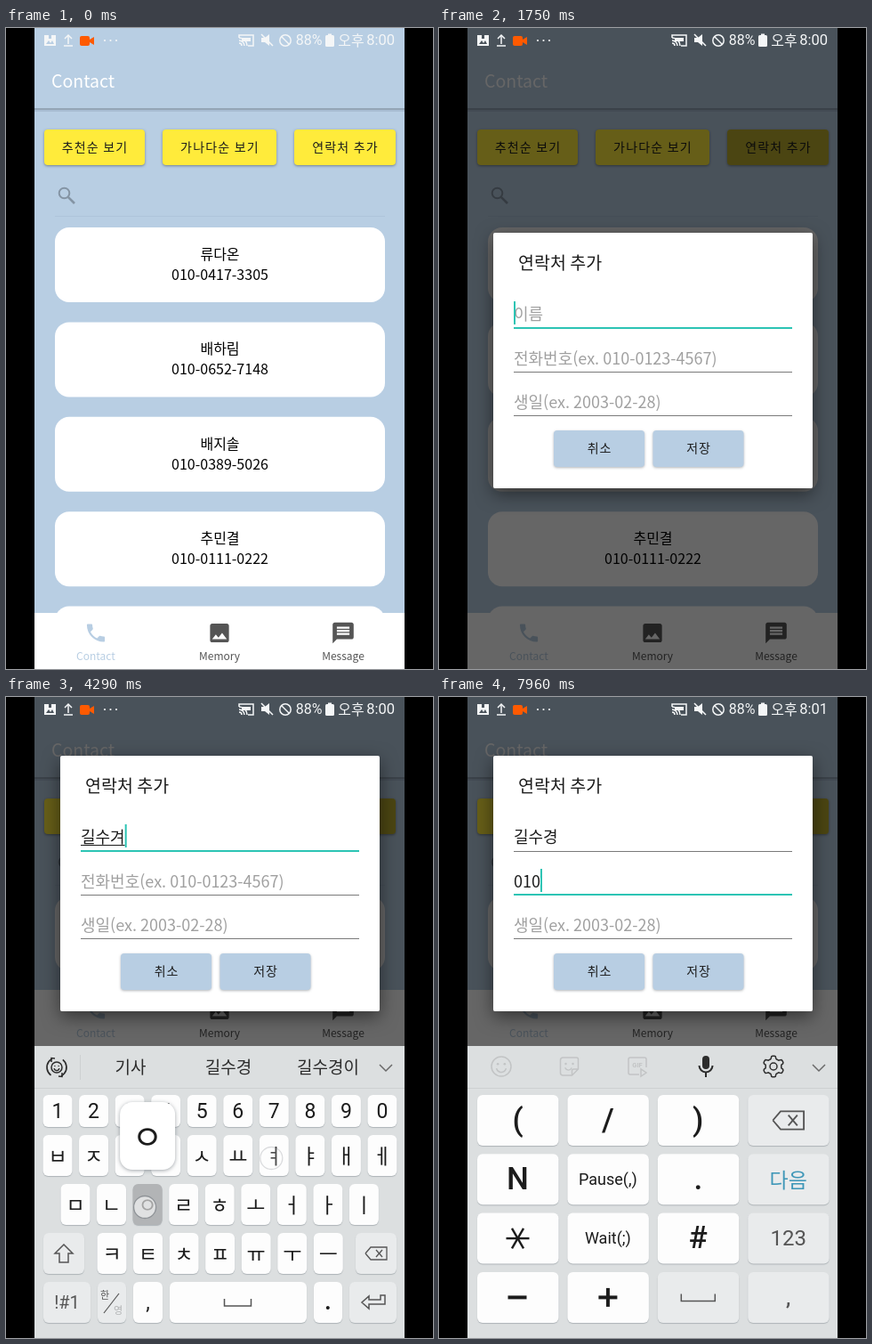
These frames come from a looping animation (480 by 720 pixels, 8000 ms). An HTML page with a canvas:

```html
<!DOCTYPE html>
<html lang="ko">
<head>
<meta charset="utf-8">
<title>Contact</title>
<style>
html, body { margin: 0; width: 100%; height: 100%; overflow: hidden; background: #000; }
canvas { display: block; width: 480px; height: 720px; }
</style>
</head>
<body>
<canvas id="stage" width="480" height="720"></canvas>
<script>
const ctx = document.getElementById('stage').getContext('2d');
const LOOP = 8000;
const KR = '"Noto Sans CJK KR", "Noto Sans CJK", sans-serif';
const UI = 'Roboto, "Noto Sans CJK KR", sans-serif';
const BLUE = '#b8cee3', YELLOW = '#ffeb3b', TEAL = '#2cc4b4';
const INK = '#1c1c1c', GREY = '#555555', HINT = '#a0a0a0', FAINT = '#c2c4c5';
const KEY = '#fdfdfd', FN = '#e9ebec', HELD = '#b2b4b6', BOARD = '#dcdfe0', KEY_EDGE = 'rgba(90,100,110,.35)';

const NAME = '길수경';
const CARDS = [
  ['류다온', '010-0417-3305'], ['배하림', '010-0652-7148'],
  ['배지솔', '010-0389-5026'], ['추민결', '010-0111-0222']
];

const PHONE = new Path2D('M6.6 10.8c1.4 2.8 3.8 5.1 6.6 6.6l2.2-2.2c.3-.3.7-.4 1-.2 1.1.4 2.3.6 3.6.6.5 0 1 .4 1 1V20c0 .5-.5 1-1 1-9.4 0-17-7.6-17-17 0-.6.4-1 1-1h3.5c.5 0 1 .4 1 1 0 1.2.2 2.4.6 3.6.1.3 0 .7-.3 1z');
const IMAGE = new Path2D('M21 19V5c0-1.1-.9-2-2-2H5c-1.1 0-2 .9-2 2v14c0 1.1.9 2 2 2h14c1.1 0 2-.9 2-2zM8.5 13.5l2.5 3 3.5-4.5 4.5 6H5z');
const MESSAGE = new Path2D('M20 2H4C3 2 2 3 2 4v18l4-4h14c1.1 0 2-.9 2-2V4c0-1.1-.9-2-2-2zM6 12h12v2H6zM6 9h12v2H6zM6 6h12v2H6z');

const clamp = v => Math.max(0, Math.min(1, v));
const span = (t, a, b) => clamp((t - a) / (b - a));

function rect(x, y, w, h, color) { ctx.fillStyle = color; ctx.fillRect(x, y, w, h); }
function box(x, y, w, h, r, color, shadow, blur = 3, dy = 1) {
  ctx.save();
  if (shadow) { ctx.shadowColor = shadow; ctx.shadowBlur = blur; ctx.shadowOffsetY = dy; }
  ctx.fillStyle = color;
  ctx.beginPath(); ctx.roundRect(x, y, w, h, r); ctx.fill();
  ctx.restore();
}
function text(s, x, y, size, color, { align = 'center', font = KR, weight = 400, gap = 0 } = {}) {
  ctx.font = `${weight} ${size}px ${font}`;
  ctx.letterSpacing = gap + 'px';
  ctx.textAlign = align;
  ctx.textBaseline = 'middle';
  ctx.fillStyle = color;
  ctx.fillText(s, x, y);
}
function line(points, color, width = 1.5) {
  ctx.strokeStyle = color; ctx.lineWidth = width;
  ctx.beginPath();
  points.forEach(([x, y], i) => i ? ctx.lineTo(x, y) : ctx.moveTo(x, y));
  ctx.stroke();
}
function arc(x, y, r, color, width = 1.5, a = 0, b = Math.PI * 2) {
  ctx.strokeStyle = color; ctx.lineWidth = width;
  ctx.beginPath(); ctx.arc(x, y, r, a, b); ctx.stroke();
}
function disc(x, y, r, color) {
  ctx.fillStyle = color;
  ctx.beginPath(); ctx.arc(x, y, r, 0, Math.PI * 2); ctx.fill();
}
function shape(d, color) { ctx.fillStyle = color; ctx.fill(new Path2D(d), 'evenodd'); }
function outline(d, color, width = 1.5) {
  ctx.strokeStyle = color; ctx.lineWidth = width;
  ctx.stroke(new Path2D(d));
}
function at(x, y, draw) { ctx.save(); ctx.translate(x, y); draw(); ctx.restore(); }
function glyph(path, x, y, scale, color) {
  at(x, y, () => {
    ctx.scale(scale, scale); ctx.translate(-12, -12);
    ctx.fillStyle = color; ctx.fill(path, 'evenodd');
  });
}

function statusBar(t) {
  const c = '#f4f6f7';
  shape('M43 8h13v12h-13zM48 8h3v4h-3zM45 18h9l-2-4-2 3-2-3z', c);
  line([[70, 18], [70, 8]], c);
  line([[66, 12], [70, 8], [74, 12]], c);
  line([[65, 20], [75, 20]], c);
  box(83, 9, 11, 11, 2, '#ff5a00');
  shape('M94 13l5-3v9l-5-3z', '#ff5a00');
  [111, 117.5, 124].forEach(x => disc(x, 14, 1.1, c));
  line([[262, 11], [262, 8], [278, 8], [278, 20], [272, 20]], c);
  [3, 6, 9].forEach(r => arc(262, 20, r, c, 1.5, -Math.PI / 2, 0));
  rect(265, 11, 10, 4, c);
  shape('M287 11h4l5-4v13l-5-4h-4z', c);
  line([[287, 7], [300, 20]], c);
  arc(314, 14, 6.2, c);
  line([[310, 10], [318, 18]], c);
  text('88%', 340.5, 14.5, 16, c, { font: UI });
  box(359, 8, 10, 13, 1.5, c);
  rect(362, 6.5, 4, 2, c);
  text('오후', 388, 14, 16, c);
  text(t < 4900 ? '8:00' : '8:01', 437, 14.5, 16.5, c, { font: UI, align: 'right' });
}

function app(t) {
  const navY = t < 2200 ? 657 : 329;
  rect(32, 0, 416, 720, BLUE);
  text('Contact', 51, 60, 19.5, '#ffffff', { align: 'left', weight: 300 });
  rect(32, 90, 416, 2, '#94a5b6');
  rect(32, 92, 416, 2, 'rgba(50,70,90,.12)');

  const press = span(t, 1180, 1300);
  [['추천순 보기', 43, 113], ['가나다순 보기', 176, 128], ['연락처 추가', 324, 114]].forEach(([s, x, w], i) => {
    box(x, 114, w, 40, 4, YELLOW, 'rgba(40,50,60,.5)');
    if (i === 2 && press) box(x, 114, w, 40, 4, `rgba(0,0,0,${.26 * press})`);
    text(s, x + w / 2 + .5, 134, 14, INK, { gap: 1.2 });
  });
  arc(65.5, 185.5, 5.8, '#8494a4', 2);
  line([[69.8, 189.8], [77, 197]], '#8494a4', 2.6);
  rect(55, 211, 371, 1, 'rgba(100,125,150,.12)');

  ctx.save();
  ctx.beginPath(); ctx.rect(32, 212, 416, navY - 212); ctx.clip();
  for (let i = 0; i < 5; i++) {
    const y = 224 + i * 106.4;
    box(55, y, 371, 84, 16, '#ffffff');
    if (CARDS[i]) {
      text(CARDS[i][0], 240.5, y + 30, 16, '#000000');
      text(CARDS[i][1], 240.5, y + 53, 16, '#000000');
    }
  }
  ctx.restore();

  rect(32, navY, 416, 720 - navY, '#ffffff');
  [[PHONE, 'Contact', 101, 1.12], [IMAGE, 'Memory', 240, 1.18], [MESSAGE, 'Message', 379, 1.18]].forEach(([p, s, x, k], i) => {
    const color = i ? GREY : BLUE;
    glyph(p, x, navY + 22.5, k, color);
    text(s, x, navY + 48.5, 12, color);
  });
}

const STROKES = [...'ㄱㅣㄹㅅㅜㄱㅕㅇ'];
const COMPOSED = ['', 'ㄱ', '기', '길', '길ㅅ', '길수', '길숙', '길수겨', NAME];
const strokeAt = i => 2900 + i * 193;
const typedCount = t => STROKES.filter((_, i) => t >= strokeAt(i) + 110).length;
const DIGITS = [['0', 6710, 190, 674], ['1', 6890, 88, 475], ['0', 7070, 190, 674]];
const PAD_AT = 5400, SYMBOLS_AT = 7720;

function dialog(t, y) {
  // The shadow stays outside, so that a half faded panel is not darkened by it.
  ctx.save();
  ctx.beginPath(); ctx.rect(32, 0, 416, 720); ctx.rect(61, y, 359, 287); ctx.clip('evenodd');
  box(61, y, 359, 287, 2, '#ffffff', 'rgba(0,0,0,.5)', 20, 6);
  ctx.restore();
  box(61, y, 359, 287, 2, '#ffffff');
  text('연락처 추가', 89, y + 34, 19.5, INK, { align: 'left' });
  const n = typedCount(t);
  const second = t >= PAD_AT;
  const number = DIGITS.filter(k => t >= k[1] + 40).map(k => k[0]).join('');
  const rows = [
    [COMPOSED[n], '이름', 91, 107],
    [number, '전화번호(ex. 010-0123-4567)', 141, 156],
    ['', '생일(ex. 2003-02-28)', 190, 205]
  ];
  rows.forEach(([value, hint, ty, ly], i) => {
    const focus = i === (second ? 1 : 0);
    text(value || hint, 84, y + ty, 18, value ? INK : HINT, { align: 'left' });
    const w = value ? ctx.measureText(value).width : 0;
    rect(84, y + ly - (focus ? 1 : 0), 313, focus ? 2 : 1, focus ? TEAL : '#7a7a7a');
    if (!focus) return;
    if (value && !second) rect(84, y + ty + 9, w, 1, INK);
    let on;
    if (second) on = t < 5900 || t >= 6710;
    else on = n ? t < 4860 || t >= 5240 : Math.floor((t - 1350) / 500) % 2 === 0;
    if (on) rect(84 + w, y + ty - 14, 2, 26, TEAL);
  });
  [['취소', 129], ['저장', 240.5]].forEach(([s, x]) => {
    box(x, y + 222, 102, 41, 4, BLUE, 'rgba(60,70,80,.4)');
    text(s, x + 51.5, y + 242, 14, INK, { gap: .8 });
  });
}

// Toolbar icons, drawn around their own centre.
function smile(c, r = 11) {
  arc(0, 0, r, c);
  disc(-r * .35, -r * .25, r * .12, c); disc(r * .35, -r * .25, r * .12, c);
  arc(0, r * .1, r * .5, c, 1.5, .2, Math.PI - .2);
}
function sticker(c) {
  outline('M-7-10H8q2 0 2 2V3L3 10H-7q-3 0-3-3V-7q0-3 3-3zM10 3H5q-2 0-2 2v5', c);
  disc(-4, -3, 1.2, c); disc(4, -3, 1.2, c);
  arc(-1, 0, 4, c, 1.4, .4, 2.8);
}
function movie(c) {
  outline('M2 9H-8q-2 0-2-2V-8q0-2 2-2H8q2 0 2 2v9M4 3v8l6-4z', c);
  text('GIF', 0, -1.5, 7.5, c, { font: UI, weight: 700 });
}
function mic(c) {
  box(-4, -12, 8, 15, 4, c);
  arc(0, -1, 7.5, c, 2, 0, Math.PI);
  line([[0, 6], [0, 12]], c, 2);
}
function gear(c) {
  arc(0, 0, 4, c);
  ctx.beginPath();
  for (let i = 0; i <= 64; i++) {
    const a = i / 64 * Math.PI * 2, r = 10.3 - 1.5 * Math.tanh(3 * Math.cos(a * 6));
    ctx.lineTo(r * Math.cos(a), r * Math.sin(a));
  }
  ctx.stroke();
}
function cycle(c) {
  arc(0, 0, 11, c, 1.7, -.9, 1.1);
  arc(0, 0, 11, c, 1.7, 2.2, 4.2);
  line([[2, 10], [6, 10.5], [6, 6]], c);
  line([[-2, -10], [-6, -10.5], [-6, -6]], c);
}
function backspace(x, y, s) {
  at(x, y, () => {
    ctx.scale(s, s);
    line([[-12, 0], [-6, -7], [12, -7], [12, 7], [-6, 7], [-12, 0]], GREY, 1.3);
    line([[0, -4], [7, 4]], GREY, 1.3);
    line([[7, -4], [0, 4]], GREY, 1.3);
  });
}
function spaceMark(x, y, w) {
  line([[x - w, y - 4], [x - w, y + 4], [x + w, y + 4], [x + w, y - 4]], GREY);
}
function star(x, y, r, c, w) {
  for (let i = 0; i < 3; i++) {
    const a = i * Math.PI / 3, dx = r * Math.cos(a), dy = r * Math.sin(a);
    line([[x - dx, y - dy], [x + dx, y + dy]], c, w);
  }
}

function toolbar(t) {
  const c = '#2c2c2c', n = typedCount(t);
  rect(32, 439, 416, 1, '#cdd0d1');
  line([[420, 413], [427, 420], [434, 413]], '#6a6a6a');
  if (t >= PAD_AT) {
    [smile, sticker, movie].forEach((f, i) => at(70 + i * 76.5, 415, () => f(FAINT)));
    at(300, 415, () => mic(c));
    at(376, 415, () => gear(c));
    return;
  }
  at(57, 416, () => {
    cycle(c);
    if (n) smile(c, 6);
    else text('T', 0, .5, 14, c, { font: UI, weight: 700 });
  });
  rect(83, 402, 1, 28, '#cdd0d1');
  if (n) {
    const guess = n < 5 ? COMPOSED[n] : NAME;
    [['기사', 140], [guess, 250], [guess + '이', 362]].forEach(([s, x]) => text(s, x, 416, 19, c, { weight: 500 }));
  } else {
    [smile, sticker, movie, mic, gear].forEach((f, i) => at(117 + i * 66, 416, () => f(c)));
  }
}

const ROWS = [
  ['1234567890', 58, 447, 36], ['ㅂㅈㄷㄱㅅㅛㅕㅑㅐㅔ', 58, 492, 46],
  ['ㅁㄴㅇㄹㅎㅗㅓㅏㅣ', 78, 547, 46], ['ㅋㅌㅊㅍㅠㅜㅡ', 119, 602, 46]
];
function keyPlace(s) {
  const row = ROWS.find(r => r[0].includes(s));
  return { x: row[1] + row[0].indexOf(s) * 40.55, y: row[2], h: row[3] };
}

function letters(t) {
  const held = STROKES.find((_, i) => t >= strokeAt(i) + 30 && t < strokeAt(i) + 130);
  const key = (x, w, y = 657, color = KEY) => box(x, y, w, 46, 6, color, KEY_EDGE, 1);
  ROWS.forEach(([chars, , , h], r) => [...chars].forEach(s => {
    const k = keyPlace(s);
    box(k.x - 16.5, k.y, 33, h, 6, s === held ? HELD : KEY, KEY_EDGE, 1);
    text(s, k.x, k.y + h / 2 + (r ? 0 : 1), 23, INK, { font: r ? KR : UI, weight: r ? 500 : 400 });
  }));
  key(42, 46, 602, FN);
  outline('M65 615l10 10h-5v10h-10v-10h-5z', GREY);
  key(393, 46, 602, FN);
  backspace(416, 625, 1);
  key(42, 53, 657, FN);
  text('!#1', 68.5, 681, 20, GREY, { font: UI });
  key(103, 32, 657, FN);
  text('한', 111, 672, 11, GREY);
  text('영', 126, 689, 11, '#b0b2b3');
  line([[110, 692], [127, 670]], GREY, 1.2);
  key(143, 33);
  text(',', 159.5, 681, 23, INK, { font: UI });
  key(184, 154);
  spaceMark(260.5, 680, 15);
  key(346, 32);
  text('.', 362, 681, 25, INK, { font: UI, weight: 700 });
  key(386, 53, 657, t >= 5250 ? HELD : FN);
  outline('M426 672v10h-18v5l-8-7 8-7v4h13v-5z', GREY);

  if (held) {
    const k = keyPlace(held);
    const x = Math.min(k.x, 408);
    box(x - 31, k.y - 92, 62, 76, 14, '#ffffff', 'rgba(70,80,90,.5)', 4);
    text(held, x, k.y - 53, 38, INK, { weight: 500 });
  }
}

const LABELS = ['', 'ABC', 'DEF', 'GHI', 'JKL', 'MNO', 'PQRS', 'TUV', 'WXYZ'];
const SIGNS = ['(', '/', ')', 'N', 'Pause(,)', '.', '*', 'Wait(;)', '#', '−', '+', ' '];

function sideKey(r, cx, cy, signs) {
  if (r === 0) backspace(cx, cy, 1.45);
  else if (r === 1) text('다음', cx, cy, 23, '#3f97b8', { weight: 500 });
  else if (r === 3) text(',', cx, cy + 2, 24, GREY, { font: UI, weight: 500 });
  else if (signs) text('123', cx, cy + 1, 24, GREY, { font: UI });
  else {
    star(cx - 17, cy, 5.5, '#3c3c3c', 1.8);
    text('+#', cx + 7, cy + 1, 24, '#3c3c3c', { font: UI, weight: 500 });
  }
}
function signKey(s, cx, cy) {
  if (s === '*') star(cx, cy, 13, INK, 2.4);
  else if (s === ' ') spaceMark(cx, cy, 19);
  else if (s === '−') rect(cx - 11, cy - 2, 21, 4, INK);
  else if (s === '+') { rect(cx - 10.5, cy - 2, 21, 4, INK); rect(cx - 2, cy - 10.5, 4, 21, INK); }
  else text(s, cx, cy + 1, s.length > 1 ? 18 : 35, INK, { font: UI, weight: s.length > 1 ? 400 : 500 });
}
function digitKey(r, c, x, cy) {
  const big = (s, size = 41, color = INK) => text(s, x + 13, cy + 1, size, color, { font: UI, weight: 300, align: 'left' });
  const small = (s, size) => text(s, x + 59, cy, size, '#a4a6a7', { font: UI });
  if (r < 3) { big(r * 3 + c + 1); small(LABELS[r * 3 + c], 15); }
  else if (c === 0) star(x + 24, cy, 13, '#3c3c3c', 2.2);
  else if (c === 1) { big('0'); small('+', 26); }
  else big('#', 38, '#3c3c3c');
}

function keypad(t) {
  const signs = t >= SYMBOLS_AT;
  const pressed = (x, y) => DIGITS.some(k => Math.abs(k[2] - x) < 9 && Math.abs(k[3] - y) < 9 && t >= k[1] && t < k[1] + 130);
  for (let r = 0; r < 4; r++) for (let c = 0; c < 4; c++) {
    const x = 43 + c * 101.4, y = 447 + r * 66.3, cx = x + 45.5, cy = y + 28.5;
    const soft = c === 3 || (r === 3 && (signs ? c === 2 : c !== 1));
    const down = pressed(cx, cy) || (c === 3 && r === 2 && t >= 7580 && !signs);
    box(x, y, 91.5, 57, 6, down ? '#c6c9cb' : soft ? FN : KEY, KEY_EDGE, 1);
    if (c === 3) sideKey(r, cx, cy, signs);
    else if (signs) signKey(SIGNS[r * 3 + c], cx, cy);
    else digitKey(r, c, x, cy);
  }
}

function touch(t, start, x, y) {
  const age = t - start;
  if (age < 0 || age > 300) return;
  ctx.globalAlpha = 1 - span(age, 110, 300);
  disc(x, y, 12.5, 'rgba(255,255,255,.6)');
  arc(x, y, 12.5, 'rgba(130,135,140,.8)', 1.3);
  ctx.globalAlpha = 1;
}
function touches(t) {
  touch(t, 1130, 384, 136);
  STROKES.forEach((s, i) => {
    const k = keyPlace(s);
    touch(t, strokeAt(i), k.x + (i ? -3 : 11), k.y + (i ? 26 : 33));
  });
  touch(t, 5230, 412, 683);
  DIGITS.forEach(([, start, x, y]) => touch(t, start, x, y + 2));
  touch(t, 7580, 394, 610);
}

function draw(t) {
  const fade = span(t, 1400, 1600), rise = span(t, 2200, 2500);
  rect(0, 0, 480, 720, '#000');
  ctx.save();
  ctx.beginPath(); ctx.rect(32, 0, 416, 720); ctx.clip();
  app(t);
  rect(32, 0, 416, 720, `rgba(0,0,0,${.6 * fade * fade})`);
  statusBar(t);
  if (rise) at(0, 78 * (1 - rise), () => {
    rect(32, 392, 416, 328, BOARD);
    toolbar(t);
    t < PAD_AT ? letters(t) : keypad(t);
    rect(32, 392, 416, 328, `rgba(92,95,96,${1 - rise})`);
  });
  if (fade) {
    ctx.globalAlpha = fade;
    dialog(t, 230 - 164 * rise);
    ctx.globalAlpha = 1;
  }
  touches(t);
  ctx.restore();
}

function tick() {
  draw(performance.now() % LOOP);
  requestAnimationFrame(tick);
}
tick();
</script>
</body>
</html>
```
